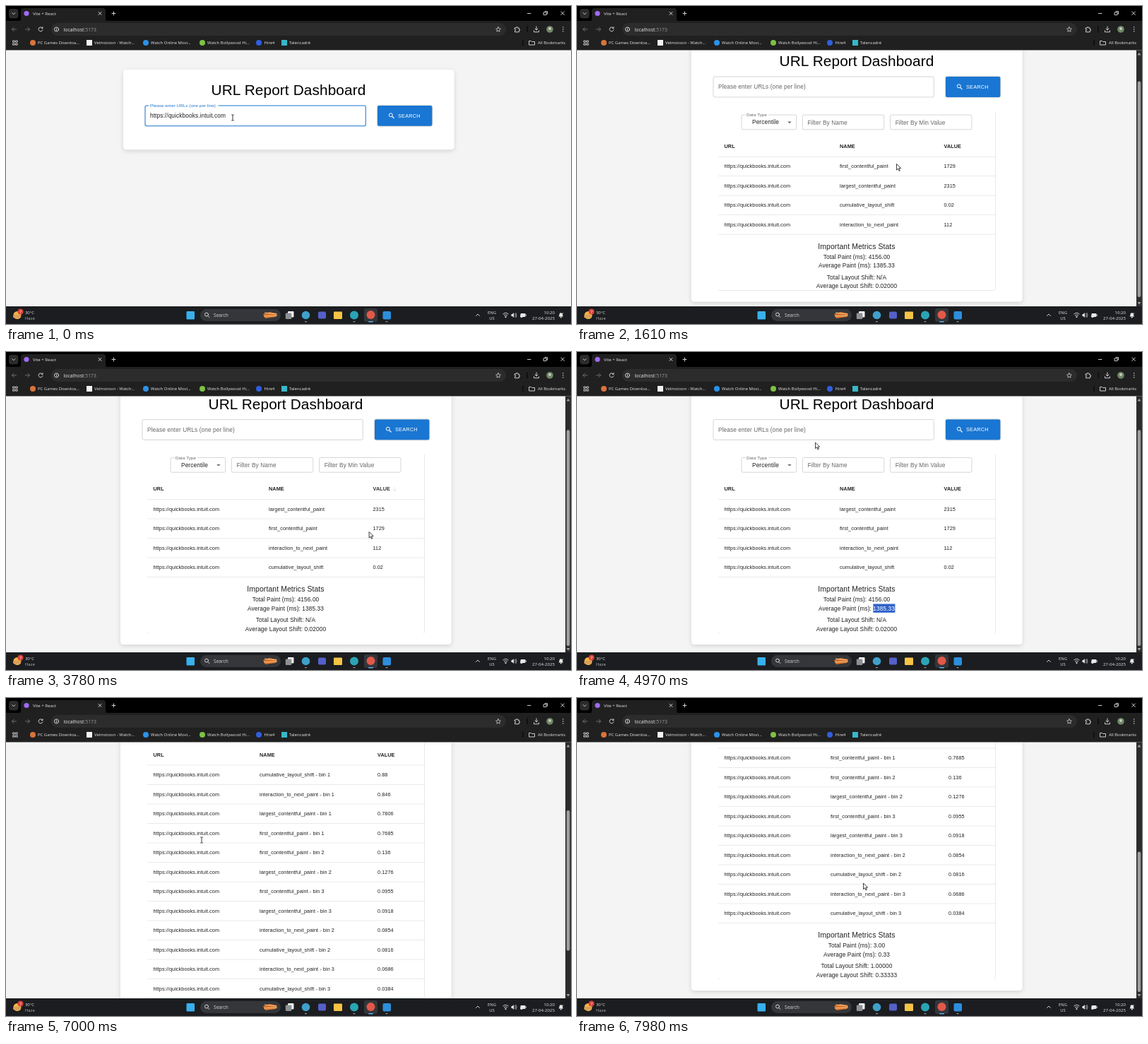
An HTML page that plays this animation: 800x450 px, repeating every 8000 ms.

```html
<!DOCTYPE html>
<html lang="en">
<head>
<meta charset="utf-8">
<title>URL Report Dashboard</title>
<style>
  html, body { margin: 0; width: 100%; height: 100%; overflow: hidden; background: #000; }
  svg { display: block; width: 800px; height: 450px; }
  text { white-space: pre; }
  .ui { font-family: "Open Sans", "Noto Sans", sans-serif; }
  .page { font-family: "Liberation Sans", Arial, sans-serif; }
  .line { fill: none; stroke: #e3e3e3; stroke-width: .9; stroke-linecap: round; stroke-linejoin: round; }
  .card { filter: drop-shadow(0 2px 3px rgba(0,0,0,.13)); }
  .paper { filter: drop-shadow(0 .7px .6px rgba(0,0,0,.35)); }
  .menu { filter: drop-shadow(0 2px 3px rgba(0,0,0,.3)); }
</style>
</head>
<body>
<svg viewBox="0 0 800 450">
  <defs><clipPath id="view"><rect y="62.5" width="800" height="363"/></clipPath></defs>
  <rect y="62" width="800" height="364" fill="#f4f4f4"/>
  <g clip-path="url(#view)" class="page" id="page"></g>
  <g class="ui" id="chrome"></g>
  <g id="cursor"></g>
</svg>
<script>
const LOOP = 8000, BLUE = '#1976d2', GREY = '#666', INK = '#212121', EDGE = '#c4c4c4';
const el = id => document.getElementById(id);

// ---------- drawing helpers ----------
const text = (x, y, s, size, fill = INK, more = '') =>
  `<text x="${x}" y="${y}" font-size="${size}" fill="${fill}" ${more}>${s}</text>`;
const rect = (x, y, w, h, fill, r = 0, more = '') =>
  `<rect x="${x}" y="${y}" width="${w}" height="${h}" fill="${fill}" rx="${r}" ${more}/>`;
const circle = (x, y, r, fill, more = '') => `<circle cx="${x}" cy="${y}" r="${r}" fill="${fill}" ${more}/>`;
const line = (d, more = '') => `<path class="line" d="${d}" ${more}/>`;
const mid = 'text-anchor="middle"', end = 'text-anchor="end"';

// Page text is placed by the middle of its line box.
const label = (x, cy, s, size, fill, more = '') =>
  text(x, cy + size * .35, s, size, fill, `letter-spacing="${size * .0098}" ${more}`);
const body = (x, cy, s, fill, more) => label(x, cy, s, 8.333, fill, more);
const cell = (x, cy, s, more) => label(x, cy, s, 7.29, INK, more);
const outline = (x, y, w, h, on) =>
  rect(x, y, w, h, 'none', 2, `stroke="${on ? BLUE : EDGE}" stroke-width="${on ? 1.04 : .7}"`);

// ---------- timing helpers ----------
const clamp = v => Math.max(0, Math.min(1, v));
const ramp = (t, a, b) => { const p = clamp((t - a) / (b - a)); return p * p * (3 - 2 * p); };
const pulse = (t, a, b, len) => ramp(t, a, a + len) - ramp(t, b, b + len);

// ---------- browser and taskbar ----------
function drawChrome() {
  const white = '#e8e8e8', dim = '#8a8a8a';
  let s = rect(0, 0, 800, 22, '#000') + rect(0, 21, 800, 41.5, '#202020');
  // tab strip
  s += rect(4, 4, 13.5, 13.5, '#2b2b2b', 4) + line('M8.8 9.8l2 2 2-2') +
    `<path d="M17 22q4 0 4-4V7q0-4 4-4h112q4 0 4 4v11q0 4 4 4z" fill="#202020"/>` +
    circle(29, 10.5, 3.6, '#a06bf5') + text(38, 12.8, 'Vite + React', 6.08, white) +
    line('M131 8.5l4 4m0-4l-4 4M150 10.5h5m-2.5-2.5v5M738.5 10.5h4.5M785.8 8l4.6 4.6m0-4.6l-4.6 4.6') +
    line('M761.5 9h3.6v3.6h-3.6zM763 7.6h3.5v3.6', 'stroke-width=".7"');
  // toolbar
  s += line('M14.5 33h-6m2.6-2.6L8.500 33l2.600 2.600M27.500 33h6m-2.600-2.600L33.500 33l-2.600 2.600', 'style="stroke:#777"') +
    line('M51.600 31.200a3 3 0 1 0 .4 2.600M52 29.800v1.800h-1.800') +
    rect(64, 24, 644, 18, '#2c2c2c', 9) + circle(71.5, 33, 3, 'none', 'class="line"') +
    line('M71.5 32.800v1.600M71.5 31.300v.1') +
    text(81.5, 35.500, 'localhost<tspan fill="#9a9a9a">:5173</tspan>', 6.9, white) +
    line('M697 29.700l1 2.200 2.400.3-1.800 1.600.5 2.400-2.100-1.200-2.100 1.200.5-2.400-1.800-1.600 2.400-.3z', 'style="stroke-width:.7"') +
    line('M720.500 31h2q-.3-1.500.9-1.500t.9 1.500h2v2q1.400-.3 1.400.9t-1.400.9v2h-5.800v-2q1.300 0 1.300-1t-1.300-1z') +
    rect(737.5, 28.5, 1, 9, '#000') +
    line('M751 29v5m-2-2l2 2 2-2M747.500 34.800v2h7v-2') +
    circle(770, 33, 4.8, '#708767') + circle(770, 32, 1.9, '#c9cfc0') +
    [30, 33, 36].map(y => circle(788.800, y, .7, white)).join('');
  // bookmarks
  s += line('M10 49h2.200v2.200h-2.200zM14 49h2.200v2.200h-2.200zM10 53h2.200v2.200h-2.200zM14 53h2.200v2.200h-2.200z', 'style="stroke-width:.8"');
  [[38, 45, 'PC Games Downloa...', '#d9733a'], [118, 125, 'Velmotoon - Watch...', '#f4f4f4', 1],
   [198, 205, 'Watch Online Movi...', '#2b93e8'], [278, 285, 'Watch Bollywood Hi...', '#7cc243'],
   [358, 365.5, 'Hire4', '#2f5fe0'], [394, 401, 'Talencadré', '#35b8c9', 1]].forEach(([x, tx, name, c, square]) =>
    s += (square ? rect(x - 4, 48, 8, 8, c) : circle(x, 52, 4, c)) + text(tx, 54.2, name, 5.95, white));
  s += rect(731.5, 48, 1, 8, '#000') + line('M741 49.500h2.500l1 1h4v4.500h-7.500z') +
    text(753, 54.2, 'All Bookmarks', 5.85, white);

  // taskbar
  s += rect(0, 425, 800, 25, '#1b1d20') +
    circle(16, 437.500, 5.5, '#f3b547') + rect(10, 437, 11, 4.5, '#d9a05a', 2) +
    circle(20.500, 432.500, 4, '#d9413a') + text(20.500, 434.600, '7', 5.6, '#fff', mid) +
    text(27, 435.5, '30°C', 5.9, white) + text(27, 443.500, 'Haze', 5.9, '#b5b5b5') +
    rect(255.500, 432, 11.500, 11.500, '#38b0ee', 1) +
    rect(275, 429, 114, 17, '#34363a', 8.5) + circle(284, 436.600, 2.500, 'none', 'class="line"') +
    line('M286 438.600l2 2') + text(294, 440, 'Search', 6.64, '#d5d5d5') +
    `<path d="M364 436l9-3 11 2-2 5-15 2z" fill="#d9722c"/><path d="M366 434l17 2M365 439l19-1" stroke="#f2c98b"/>` +
    rect(399, 432, 8.500, 8.500, '#f0f0f0', 1) + rect(395.800, 434.500, 8.500, 8.500, '#8e9194', 1) +
    circle(424.500, 437.500, 5.800, '#3fa0c9') + rect(442, 432.500, 11, 10, '#5560c9', 2) +
    rect(464, 432.500, 12, 10.500, '#f6c445', 1) + circle(493, 437.500, 6, '#2aa5b5') +
    rect(507, 428, 19, 19, '#33363a', 3) + circle(516.500, 437, 6, '#e2584a') +
    rect(533.500, 432, 11.500, 11.500, '#2d8fdc', 2);
  [424.500, 493, 539].forEach(x => s += rect(x - 1.5, 446, 3, 1.3, '#9a9a9a', .6));
  s += rect(513, 446, 7, 1.4, '#5bb4f0', .7) + line('M665.500 438.500l2.500-2.500 2.500 2.500') +
    text(688, 435.8, 'ENG', 5.9, white, mid) + text(688, 443.8, 'US', 5.9, white, mid) +
    line('M703.800 435.800q3.700-3.200 7.400 0M705.300 437.600q2.200-1.800 4.400 0M706.600 439.300q.9-.7 1.800 0') + circle(707.500, 440.400, .8, white) +
    `<path d="M715.500 436h1.500l2-2v7l-2-2h-1.500z" fill="${white}"/>` + line('M720.600 435.500q1.300 2 0 4M722 434.300q2.200 3.200 0 6.400', 'style="stroke-width:.7"') +
    rect(728.500, 435, 7, 5, white, 1) + rect(735.800, 436.500, 1, 2, white) + circle(730, 439, 2, white) +
    text(777, 435.5, '10:20', 6.1, white, end) + text(777, 443.500, '27-04-2025', 6.13, white, end) +
    `<path d="M782.500 439.500q1-.8 1-3 0-2.300 2.300-2.300t2.300 2.300q0 2.200 1 3z" fill="${white}"/>` + circle(785.800, 440.600, 1, white) +
    text(787.400, 436.200, 'z', 4, white);
  el('chrome').innerHTML = s;
}

// ---------- table data ----------
const METRIC = { F: 'first_contentful_paint', L: 'largest_contentful_paint', C: 'cumulative_layout_shift', I: 'interaction_to_next_paint' };
const parse = src => src.split(' ').map(item => {
  const [key, value] = item.split('=');
  return { name: METRIC[key[0]] + (key[1] ? ' - bin ' + key[1] : ''), value };
});
const percentile = parse('F=1729 L=2315 C=0.02 I=112');
const histogram = parse('C1=0.88 I1=0.846 L1=0.7806 F1=0.7685 F2=0.136 L2=0.1276 F3=0.0955 L3=0.0918 I2=0.0854 C2=0.0816 I3=0.0686 C3=0.0384');
const byName = [...percentile].sort((a, b) => a.name < b.name ? -1 : 1);
const rising = [...percentile].sort((a, b) => a.value - b.value);
const falling = [...rising].reverse();

const T = { blur: 840, results: 910, nameSort: 2310, valueAsc: 3080, valueDesc: 3220, open: 5320, pick: 5600, swap: 5670 };

const rowsAt = t => t >= T.swap ? histogram : t >= T.valueDesc ? falling :
  t >= T.valueAsc ? rising : t >= T.nameSort ? byName : percentile;

const scrollAt = t => 45.5 * ramp(t, 1330, 1680) + 113.5 * ramp(t, 6440, 6860) + 106.5 * ramp(t, 7000, 7500);

// ---------- page parts ----------
function searchForm(t) {
  const focused = t < T.blur, shrink = 1 - ramp(t, T.blur, T.blur + 200);
  const hover = pulse(t, 490, 1200, 200);
  let s = text(396, 126.300, 'URL Report Dashboard', 20.83, '#000', mid + ' letter-spacing=".1"');
  s += outline(193, 141, 312.3, 28.800, focused);
  if (shrink > .5) s += rect(198, 139.5, 98.5, 3, '#fff');
  s += label(200, 155.300 - 14.300 * shrink, 'Please enter URLs (one per line)', 8.333 - 2.083 * shrink, focused ? BLUE : GREY);
  if (focused) s += body(200, 155.500, 'https://quickbooks.intuit.com');
  s += `<g style="filter:drop-shadow(0 ${.8 + hover * .7}px ${.8 + hover}px rgba(0,0,0,.4))">` +
    rect(522, 141, 77.300, 28.800, BLUE, 2) + rect(522, 141, 77.300, 28.800, '#1565c0', 2, `opacity="${hover}"`) + '</g>';
  s += `<g fill="none" stroke="#fff">${circle(540.800, 154.300, 2.500, 'none')}<path d="M542.700 156.200l2.800 2.800" stroke-width="1.200"/></g>`;
  return s + text(551, 157.8, 'SEARCH', 7.29, '#fff', 'letter-spacing=".21"');
}

function filters(t) {
  const on = t >= T.open;
  return outline(233, 195, 77.700, 20.700, on) + rect(238, 193.5, 33, 3, '#fff') +
    label(240, 195, 'Data Type', 6.25, on ? BLUE : GREY) +
    body(248, 205.300, t < T.swap ? 'Percentile' : 'Histogram') +
    '<path d="M298.300 204.500h5.200l-2.600 2.600z" fill="#666"/>' +
    outline(319.300, 195, 115.500, 20.700) + body(326.500, 205.500, 'Filter By Name', GREY) +
    outline(443.500, 195, 115.500, 20.700) + body(450.700, 205.500, 'Filter By Min Value', GREY);
}

function heading(x, name, hover, turn) {
  const shade = Math.round(33 + 69 * hover), bold = `font-weight="700"`;
  const width = name === 'NAME' ? 22.300 : 25;
  return label(x, 239.300, name, 7.29, `rgb(${shade},${shade},${shade})`, bold) +
    `<path d="M0-2.800v5.400M-2.700 0l2.700 2.700 2.700-2.700" fill="none" stroke="#777" opacity="${hover * .6}"
      transform="translate(${x + width + 6} 239.300) rotate(${turn})"/>`;
}

function table(t, rows) {
  const bins = rows === histogram, nameX = bins ? 359 : 372, valueX = bins ? 526 : 519.500;
  let s = label(208.500, 239.300, 'URL', 7.29, INK, 'font-weight="700"') +
    heading(nameX, 'NAME', pulse(t, 2200, 2820, 200), 180) +
    heading(valueX, 'VALUE', pulse(t, 3000, 3650, 200), 180 * (1 - ramp(t, T.valueDesc, T.valueDesc + 200)));
  rows.forEach(({ name, value }, i) => {
    const y = 267.700 + i * 27.5;
    s += rect(200, y - 14, 392.500, .6, '#dcdcdc') + cell(208.500, y, 'https://quickbooks.intuit.com') +
      cell(nameX, y, name) + cell(valueX, y, value);
  });
  return s + rect(200, 253.700 + rows.length * 27.5, 392.500, .6, '#dcdcdc');
}

function stats(t, bins) {
  const selected = bins || t > T.open ? 0 : ramp(t, 4060, 4410);
  const [total, average, shift, avgShift] = bins ? ['3.00', '0.33', '1.00000', '0.33333'] : ['4156.00', '1385.33', 'N/A', '0.02000'];
  const tint = selected > .5 ? ' fill="#fff"' : '';
  return label(396, 381.200, 'Important Metrics Stats', 10.42, INK, mid) +
    body(396, 395.600, `Total Paint (ms): ${total}`, INK, mid) +
    rect(450.400 - 31 * selected, 402, 31 * selected, 12.300, '#2f62c9') +
    body(396, 408.200, `Average Paint (ms): <tspan${tint}>${average}</tspan>`, INK, mid) +
    body(396, 424.800, `Total Layout Shift: ${shift}`, INK, mid) +
    body(396, 437.300, `Average Layout Shift: ${avgShift}`, INK, mid);
}

function menu(t) {
  const show = pulse(t, T.open, T.pick, 140);
  if (show <= 0) return '';
  return `<g opacity="${show}">` + rect(233, 216, 77.700, 45.800, '#fff', 2, 'class="menu"') +
    rect(233, 220.200, 77.700, 18.700, '#e3eefa') + (t > 5460 ? rect(233, 238.900, 77.700, 18.700, '#f5f5f5') : '') +
    body(241.300, 229.600, 'Percentile') + body(241.300, 248.300, 'Histogram') + '</g>';
}

function scrollbar(scroll, extra) {
  const ratio = 344 / (408 + extra);
  return rect(792, 62, 8, 364, '#2c2c2c') + rect(793.700, 72 + scroll * ratio, 4.600, 362.5 * ratio, '#9f9f9f', 2.3) +
    '<path d="M793.500 69.500l2.500-3.500 2.500 3.500zM793.500 419l2.500 3.500 2.500-3.500z" fill="#9f9f9f"/>';
}

function drawPage(t) {
  const ready = t >= T.results, rows = rowsAt(t), extra = (rows.length - 4) * 27.5, scroll = scrollAt(t);
  let s = `<g transform="translate(${ready ? 0 : 4} ${-scroll})">` +
    rect(162, 90, 468.600, ready ? 369.5 + extra : 113.300, '#fff', 4.2, 'class="card"') + searchForm(t);
  if (ready) {
    s += rect(200, 188, 392.500, 255.500 + extra, '#fff', 2, 'class="paper"') + rect(199, 186, 395, 4, '#fff') +
      filters(t) + table(t, rows) +
      `<g transform="translate(0 ${extra})">${stats(t, rows === histogram)}</g>` + menu(t);
  }
  s += '</g>';
  const locked = t >= T.open && t < T.pick + 140;
  if (ready && !locked) s += scrollbar(scroll, extra);
  el('page').innerHTML = s;
}

// ---------- pointer: time, x, y, shape until the next point ----------
const path = [
  [0, 321, 158, 'beam'], [70, 321, 158, 'beam'], [210, 420, 157, 'beam'], [350, 420, 157, 'beam'],
  [430, 511, 159, 'arrow'], [490, 530, 160, 'hand'], [630, 562, 160, 'hand'], [1190, 562, 160, 'hand'],
  [1260, 545, 176, 'arrow'], [1750, 430, 235, 'arrow'], [2030, 430, 235, 'arrow'], [2240, 401, 194, 'hand'],
  [2800, 401, 194, 'arrow'], [3010, 549, 195, 'hand'], [3640, 549, 195, 'arrow'], [3990, 451, 362, 'beam'],
  [4060, 451, 362, 'beam'], [4410, 420, 362, 'beam'], [4480, 420, 362, 'arrow'], [4970, 337.5, 128, 'arrow'],
  [5250, 290, 159, 'hand'], [5390, 290, 159, 'hand'], [5530, 272, 201, 'hand'], [5740, 272, 201, 'arrow'],
  [5950, 272, 201, 'arrow'], [6230, 424, 231, 'arrow'], [6300, 424, 231, 'arrow'], [6600, 277, 201, 'beam'],
  [7000, 277, 201, 'beam'], [7140, 285, 205, 'arrow'], [7770, 402, 258, 'arrow'], [7980, 405.5, 262, 'arrow']
];
const beam = 'M-1.700-4h1.200q.5 0 .5.500v7q0 .5-.5.500h-1.200M1.700-4h-1.200q-.5 0-.5.500M1.700 4h-1.200q-.5 0-.5-.5';
const solid = d => `<path d="${d}" fill="#fff" stroke="#111" stroke-width=".8" stroke-linejoin="round"/>`;
const shapes = {
  beam: `<g fill="none"><path d="${beam}" stroke="#fff" stroke-width="1.800"/><path d="${beam}" stroke="#222" stroke-width=".9"/></g>`,
  arrow: solid('M0 0v8.600l2-1.900 1.400 3.200 1.400-.6-1.400-3.100h2.700z'),
  hand: solid('M-1 .3a1 1 0 0 1 2 0v4.200l3.400.8q1.200.4 1 1.800l-.6 3.400q-.2 1-1.200 1h-3.800q-.8 0-1.300-.8l-2.300-3.400q-.5-1 .4-1.300.7-.2 1.400.6l1 .9z')
};

function drawCursor(t) {
  const i = path.findLastIndex(p => p[0] <= t), a = path[i], b = path[i + 1] || a;
  const p = a === b ? 0 : ramp(t, a[0], b[0]);
  el('cursor').innerHTML = `<g transform="translate(${a[1] + (b[1] - a[1]) * p} ${a[2] + (b[2] - a[2]) * p})">${shapes[a[3]]}</g>`;
}

function frame() {
  const t = performance.now() % LOOP;
  drawPage(t);
  drawCursor(t);
  requestAnimationFrame(frame);
}
drawChrome();
frame();
</script>
</body>
</html>
```
